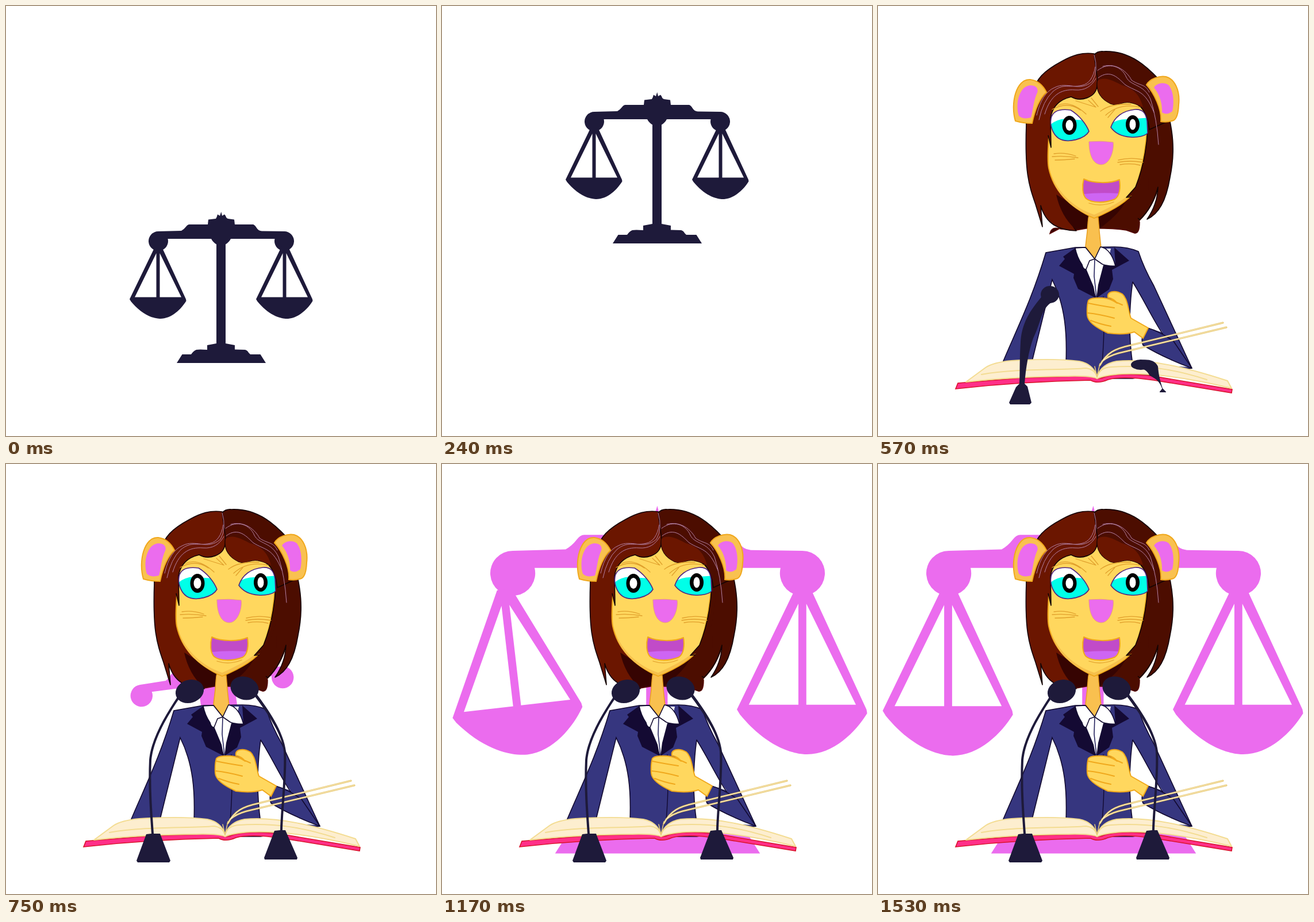
Animation, 748 px wide and 748 px high, one loop 1650 ms. Source, as an HTML page:

```html
<!DOCTYPE html>
<html lang="en">
<head>
<meta charset="utf-8">
<title>Scales of justice</title>
<style>
html, body { margin: 0; width: 100%; height: 100%; overflow: hidden; background: #fff; }
svg { display: block; width: 100vw; height: 100vh; }
.ink { fill: #1e1a3a; }
.pink { fill: #eb6cee; }
.line { fill: none; stroke-linecap: round; stroke-linejoin: round; }
.suit { fill: #36367f; stroke: #120a30; stroke-width: 1.6; stroke-linejoin: round; }
.red { fill: #6b1600; stroke: #140404; stroke-width: 1.6; stroke-linejoin: round; }
.brown { fill: #4c0d00; stroke: #140404; stroke-width: 1.6; stroke-linejoin: round; }
.skin { fill: #ffd75e; stroke: #f0a81c; stroke-width: 2; stroke-linejoin: round; }
.white { fill: #fff; stroke: #120a30; stroke-width: 1.6; stroke-linejoin: round; }
</style>
</head>
<body>
<svg viewBox="0 0 748 748">
  <defs>
    <path id="frame" d="M374.3 358L376 365L380 362.5L382 365Q383 369 386 370L397 371.5L398 380L430 380Q433 381 436 386Q439 391 445 391.5L484 392A17 17 0 1 1 467.5 405L391 405Q388 411 382 414.5L382 587L398 590L398 597.5L416 598Q420 599 422 603L425 606L442.5 606L452 621L297 621L306.5 606L322 606Q326 600 331 598Q336 597 350 598L350 590L366 587L366 414.5Q360 411 357 405L281.5 405A17 17 0 1 1 265 392L305 391Q310 388 313 384Q316 380 319 380L351 380L352 371.5L365 370Q367 367 368 362.5L372 365Z"/>
    <path id="pan" fill-rule="evenodd" d="M259.5 418L215 510Q217 514 220 517C240 540 260 544 268 544C288 544 305 527 313.5 513L313 510L270.500 418ZM261.5 430L261.5 506.5L224 506.5ZM267.5 430L267.5 506.5L305 506.5Z"/>
    <path id="rimL" d="M301 196C304 180 320 179 335 181C350 190 362 205 367 218C360 231 330 240 314 230C303 222 299 207 301 196Z"/>
    <path id="rimR" d="M405 211C411 193 426 182 447 180C461 179 466 187 468 200L469 221C460 231 420 233 405 211Z"/>
    <path id="lips" d="M358 301C375 309 405 309 420 302C422 315 421 330 412 336C395 343 372 343 362 335C355 328 355 312 358 301Z"/>
    <path id="leaf" d="M386 625C398 603 412 596 440 590L600 551M390 618Q400 609 418 604L606 559"/>
    <clipPath id="eyeL"><use href="#rimL"/></clipPath>
    <clipPath id="eyeR"><use href="#rimR"/></clipPath>
    <clipPath id="mouth"><use href="#lips"/></clipPath>
  </defs>

  <g id="big" class="pink">
    <rect id="post" y="400" height="200"/>
    <use href="#frame"/>
    <g id="panL"><use href="#pan"/></g>
    <g id="panR"><use href="#pan"/></g>
  </g>

  <g id="small" class="ink">
    <use href="#frame"/><use href="#pan"/><use href="#pan" x="220"/>
  </g>

  <g id="blob" class="ink"></g>

  <g id="figure">
    <!-- hair behind -->
    <path d="M299 396Q302 382 318 388L345 390L362 387Q405 386 432 390L446 395Q455 397 455 376L440 325L312 325L318 386Z" fill="#360402" stroke="#5a0a05" stroke-width="1.5"/>
    <path d="M386 387C408 370 425 355 440 325L490 310Q480 350 455 374Q455 396 445 393Q415 385 386 387Z" fill="#4c0d00"/>
    <!-- jacket -->
    <path class="suit" d="M292 429L343 420L411 419Q435 419 453 427Q462 455 480 487L546 630L443 648L393 648L217 620C240 565 268 510 292 429Z"/>
    <path d="M303 476L267 622L327 622C329 570 326 522 303 476Z" fill="#fff" stroke="#120a30" stroke-width="1.6"/>
    <path d="M443 480C462 510 478 545 495 568L469 560Q456 575 461 590Q495 611 543 628L443 624C436 575 436 530 443 480Z" fill="#fff"/>
    <path class="line" d="M443 624C436 575 436 530 443 480C462 510 478 545 495 570" stroke="#120a30" stroke-width="1.6"/>
    <path class="suit" d="M469 560Q455 575 461 590Q495 611 546 630L514 583Q490 566 469 560Z"/>
    <path class="line" d="M392 506Q395 560 390 620" stroke="#120a30" stroke-width="1.4"/>
    <!-- shirt, lapels -->
    <path d="M350 422L405 422L398 455L380 507L360 460Z" fill="#fff"/>
    <path class="line" d="M377 440L376 470L380 506" stroke="#23215c" stroke-width="1.6"/>
    <path d="M343 421L322 436L325 440L315 452L341 466L340 473L348 492L379 508L375 488L362 457Z" fill="#140a33"/>
    <path d="M411 420L437 443L407 459L409 475L402 493L380 508L383 485L392 451L413 451Z" fill="#140a33"/>
    <path d="M361 418L364 392L366 366L383 368Q385 395 388 420L377 440Z" fill="#f9c04f" stroke="#e99f20" stroke-width="1.5"/>
    <path class="white" d="M343 421L361 420L377 440L368 443L362 458Q357 459 355 450Q346 437 343 421Z"/>
    <path class="white" d="M377 440L387 419Q405 422 413 452Q400 453 390 449Z"/>
    <!-- hair sides -->
    <path class="red" d="M300 110C276 125 258 170 258 205C255 290 262 310 274 345L286 384L283 347C292 380 315 390 345 391Q330 375 345 360L320 240L310 150Z"/>
    <path d="M310 328Q318 365 343 388L362 386L366 365L330 340Z" fill="#360402"/>
    <path class="brown" d="M430 90Q480 110 497 160C515 215 517 255 508 298C501 340 488 362 468 371Q486 345 487 315Q478 350 455 372L430 345L455 275L466 190Z"/>
    <path d="M420 358L440 325L470 300L472 340L454 368L440 375Z" fill="#4c0d00"/>
    <!-- face -->
    <path class="skin" d="M300 175C299 215 293 262 297 282C304 315 325 346 376 369C412 354 436 338 446 322C458 290 466 250 468 212L462 160L375 138L310 155Z"/>
    <path d="M301 292C312 323 340 351 376 363C410 348 430 335 443 323Q430 344 376 368C335 352 308 325 301 292Z" fill="#f6c04c"/>
    <path d="M470 210Q467 265 449 313L433 333L446 328Q474 290 476 225Z" fill="#4c0d00"/>
    <path class="line" d="M469 215Q466 270 448 315L432 333L440 332" stroke="#140404" stroke-width="1.6"/>
    <!-- fringe -->
    <path class="red" d="M258 207C258 180 266 165 270 150C274 128 288 113 320 96C338 86 355 80 376 83Q384 110 381 140C378 160 352 167 336 158Q305 165 300 195L301 246L296 225"/>
    <path class="brown" d="M376 85Q382 78 392 79C440 77 470 108 489 128L505 200L472 215Q468 182 452 172C425 160 421 176 405 170C390 163 378 150 382 130Z"/>
    <path d="M382 130C395 121 412 132 425 138C442 143 455 152 461 176L452 172C425 160 421 176 405 170C390 163 379 150 382 130Z" fill="#6b1600"/>
    <g class="line" stroke="#b481a8" stroke-width="1">
      <path d="M376 85Q384 112 373 131C350 151 330 130 307 142Q285 151 276 190"/>
      <path d="M378 106Q373 134 355 138C334 143 323 133 304 149Q287 165 280 198"/>
      <path d="M379 126Q367 148 343 146C318 144 300 155 290 188"/>
      <path d="M382 112C402 96 425 106 432 124C440 140 462 135 474 162Q485 195 488 241"/>
      <path d="M383 125C405 108 420 128 430 137C450 150 464 145 480 185"/>
      <path d="M391 105C415 98 434 115 441 129C455 139 465 135 472 150"/>
    </g>
    <!-- ears -->
    <g stroke="#f0a81c" stroke-width="2">
      <path fill="#f9c150" d="M239 200C230 170 240 126 265 128C280 130 288 140 293 150C280 162 272 185 268 204Q252 204 239 200Z"/>
      <path fill="#f9c150" d="M467 137C473 126 490 121 501 123C516 127 526 147 523 172Q522 195 514 199Q503 203 492 201C494 180 480 151 467 137Z"/>
    </g>
    <path class="pink" d="M245 191C238 170 246 139 265 138C277 138 280 146 276 153C270 167 269 186 266 194Q252 198 245 191Z"/>
    <path class="pink" d="M480 142C485 133 500 132 506 138C515 150 515 170 512 183Q503 191 494 185C495 167 488 151 480 142Z"/>
    <!-- eyes -->
    <g clip-path="url(#eyeL)"><path d="M295 170H375V245H295Z" fill="#fff"/><path d="M295 211Q311 194 332 197L375 200V245H295Z" fill="#00ffe8"/></g>
    <g clip-path="url(#eyeR)"><path d="M400 170H475V240H400Z" fill="#fff"/><path d="M400 210Q412 197 432 197L475 194V240H400Z" fill="#00ffe8"/></g>
    <g class="line" stroke="#51267f" stroke-width="1.6"><use href="#rimL"/><use href="#rimR"/></g>
    <ellipse cx="333" cy="207.5" rx="12.5" ry="16.5"/><ellipse cx="333" cy="207.5" rx="6.5" ry="9.5" fill="#fff"/>
    <ellipse cx="443" cy="206" rx="12" ry="16"/><ellipse cx="443" cy="206" rx="5.5" ry="9.5" fill="#fff"/>
    <g class="line" stroke="#e0a02c" stroke-width="1.3">
      <path d="M303 180Q330 165 352 181M312 173Q335 163 362 188M344 165L379 176L366 164M371 160L383 175M396 190Q420 168 456 176M387 183Q405 169 440 171M400 194L412 180"/>
      <path d="M306 257Q325 254 344 261M303 262Q325 260 348 264M308 268Q325 268 342 266M418 268Q438 263 460 267M417 272Q438 268 461 272M421 276Q440 273 456 277M367 343Q388 350 410 341"/>
    </g>
    <path d="M367 236Q388 234 409 237C411 252 403 276 388 276C372 275 367 255 367 236Z" class="pink" stroke="#e89b80"/>
    <g clip-path="url(#mouth)"><path d="M350 295H430V345H350Z" fill="#c14bc8"/><path d="M350 328Q388 323 430 327V345H350Z" fill="#ce65f3"/></g>
    <use href="#lips" class="line" stroke="#f0a81c" stroke-width="2"/>
    <!-- hand -->
    <path class="skin" d="M366 512Q370 507 392 508Q405 509 416 517Q410 509 400 507C398 497 411 493 425 501C435 510 435 530 440 543L470 560L461 578L446 567C430 572 415 571 400 569C380 560 365 550 364 538Q363 522 366 512Z"/>
    <path class="line" d="M366 517Q385 521 411 525M365 534Q385 536 411 543M370 547Q388 554 405 557M416 516L425 520" stroke="#f0a81c" stroke-width="2"/>
    <!-- book -->
    <path d="M135 666L139 656L250 647L370 643Q382 652 395 645Q425 637 480 644L616 667L615 673L480 651Q425 643 400 650Q382 658 370 651Q250 653 135 666Z" fill="#ff2f88" stroke="#d9142c" stroke-width="1.6"/>
    <path d="M153 654L187 629Q200 620 232 617C280 614 320 614 350 618Q375 623 381 645Q388 623 415 618C470 613 535 628 608 652L615 665Q500 637 425 640Q395 642 381 648Q370 643 330 644Q230 645 153 654Z" fill="#fdeecf" stroke="#f3dc92" stroke-width="2" stroke-linejoin="round"/>
    <path class="line" d="M180 641C240 630 320 634 362 630Q377 632 381 645Q386 629 405 628C470 624 520 633 572 650" stroke="#f3dc92" stroke-width="2"/>
    <path class="line" d="M381 645L377 627M381 645L386 622" stroke="#e9cc7b" stroke-width="1.5"/>
    <use href="#leaf" class="line" stroke="#e3c25f" stroke-width="3"/>
    <use href="#leaf" class="line" stroke="#fdeecf" stroke-width="1.2"/>
  </g>
  <g id="mics" class="ink"></g>
</svg>
<script>
const $ = id => document.getElementById(id);
const clamp = v => Math.max(0, Math.min(1, v));
const span = (t, a, b) => clamp((t - a) / (b - a));
const lerp = (a, b, k) => a + (b - a) * k;
const show = (el, on) => el.setAttribute('display', on ? 'inline' : 'none');

function make(tag, parent) {
  const el = document.createElementNS('http://www.w3.org/2000/svg', tag);
  parent.append(el);
  return el;
}

// blend two paths that share the same commands
function blend(a, b, k) {
  const nums = b.match(/-?[\d.]+/g);
  let i = 0;
  return a.replace(/-?[\d.]+/g, v => lerp(+v, +nums[i++], k).toFixed(2));
}

function sample(d, n) {
  const p = make('path', $('blob'));
  p.setAttribute('d', d);
  const len = p.getTotalLength(), out = [];
  for (let i = 0; i < n; i++) {
    const q = p.getPointAtLength(len * i / n);
    out.push([q.x, q.y]);
  }
  p.remove();
  return out;
}

const RISE = 208, MORPH = 240, MID = 420, BODY = 510;

const shift = (list, dx, dy) => list.map(([x, y]) => [x + dx, y + dy]);
const panOuter = $('pan').getAttribute('d').split('Z')[0] + 'Z';
const dot = (x, y) => `M${x} ${y}l.1 0l0 .1Z`;

// each part: start, middle and end outline
const parts = [
  { n: 260, dy: -RISE, a: $('frame').getAttribute('d'),
    b: 'M395 204Q430 192 478 215Q500 206 506 228Q503 254 486 257Q483 290 475 325Q468 370 458 392Q448 420 435 432Q435 448 429 450L394 447L402 472Q425 473 446 483L464 584L495 584L541 588L543 596L432 582L405 585L372 595Q360 606 345 602C290 622 220 627 159 621L162 612Q175 607 190 592Q205 577 224 573L241 535C245 500 270 480 290 440L302 414L362 405Q368 395 369 379L345 386L335 381L333 345L326 323L332 280Q319 283 319 267Q328 230 344 247Q370 215 390 209Z',
    c: 'M376 80Q440 77 480 122Q505 118 523 165L514 199Q520 290 480 365L455 392L385 390L388 420L453 427L480 487L546 629L616 667L615 673L425 646L382 656L135 666L139 656L190 628L217 618Q260 520 292 429L361 418L366 390L300 394L286 384Q255 310 257 205L239 200Q232 135 265 128L290 125Q330 85 376 80Z' },
  { n: 60, dy: -RISE, a: panOuter, b: 'M275 218L288 239L277 241Z', c: dot(300, 150) },
  { n: 60, dx: 220, dy: -RISE, a: panOuter, b: 'M460 475L487 522L494 552L475 535L452 498Z', c: 'M462 480L500 545L514 583L490 566L470 530Z' },
  { n: 24, a: dot(425, 405), b: 'M482 563L537 557L467 584L500 569Z', c: 'M469 560L514 583L546 630L461 590Z' },
  { n: 24, a: dot(380, 400), b: 'M413 586L411 608L399 608Z', c: dot(400, 640) },
  { n: 24, a: dot(290, 360), b: 'M329 367L340 385L369 379L331 391Z', c: dot(345, 380) },
  { n: 50, hole: 1, a: dot(330, 390), b: 'M291 463C310 500 308 540 308 585L254 585Z', c: 'M303 477C329 522 329 570 327 618L267 618Z' },
  { n: 30, hole: 1, dy: -RISE, a: 'M262 430L262 506L224 506Z', b: dot(281, 234), c: dot(300, 150) },
  { n: 30, hole: 1, dy: -RISE, a: 'M267 430L305 506L267 506Z', b: dot(281, 234), c: dot(300, 150) },
  { n: 30, hole: 1, dx: 220, dy: -RISE, a: 'M262 430L262 506L224 506Z', b: dot(471, 513), c: dot(480, 530) },
  { n: 30, hole: 1, dx: 220, dy: -RISE, a: 'M267 430L305 506L267 506Z', b: dot(471, 513), c: dot(480, 530) }
];
for (const p of parts) {
  p.keys = [shift(sample(p.a, p.n), p.dx || 0, p.dy || 0), sample(p.b, p.n), sample(p.c, p.n)];
  p.el = make('path', $('blob'));
  if (p.hole) p.el.setAttribute('fill', '#fff');
}

function drawBlob(t) {
  const late = t >= MID;
  const k = late ? span(t, MID, BODY) : span(t, MORPH, MID);
  for (const p of parts) {
    const from = p.keys[late ? 1 : 0], to = p.keys[late ? 2 : 1];
    p.el.setAttribute('d', 'M' + from.map(([x, y], i) =>
      lerp(x, to[i][0], k).toFixed(1) + ' ' + lerp(y, to[i][1], k).toFixed(1)).join('L') + 'Z');
  }
}

// head: cx cy rx ry angle
const mics = [
  { h0: [299, 502, 16, 15, 0], h1: [319.5, 395.5, 25, 20, -18],
    a: 'M285 505C272 522 250 545 248 585C246 620 247 640 246 657L240 663L228 690L230 693L264 693L267 690L260 662L255 657C257 630 262 600 270 578C284 550 284 525 303 515Z',
    b: 'M299 404C275 440 252 480 249 515C247 560 250 600 253 643L244 644L227 690L229 693L284 693L286 690L268 643L257 643C254 600 251 560 253 515C256 482 278 442 302 407Z' },
  { h0: [457, 624, 17, 9, 0], h1: [415, 390, 25, 20, 18],
    a: 'M450 632C456 630 466 630 472 642C478 647 488 648 494 665L494 666L490 671L490 672L501 672L501 671L496 666L495 665C490 650 488 640 487 627C482 616 470 614 455 616Z',
    b: 'M432 403C452 430 480 468 483 500C485 540 478 600 477 637L467 638L449 685L450 688L506 688L507 685L486 637L481 637C482 600 489 540 487 500C483 465 456 427 436 400Z' }
];
for (const m of mics) {
  m.stem = make('path', $('mics'));
  m.head = make('ellipse', $('mics'));
}

function drawMics(t) {
  const k = Math.min(1, (t - 570) / 180);
  for (const m of mics) {
    m.stem.setAttribute('d', blend(m.a, m.b, k));
    const h = m.h0.map((v, i) => lerp(v, m.h1[i], k));
    ['cx', 'cy', 'rx', 'ry'].forEach((n, i) => m.head.setAttribute(n, h[i]));
    m.head.setAttribute('transform', `rotate(${h[4]} ${h[0]} ${h[1]})`);
  }
}

const swing = (t, a, peak, b) => Math.sin(Math.PI / 2 * Math.min(span(t, a, peak), 1 - span(t, peak, b)));

function drawBig(t) {
  const left = 1 - span(t, 720, 1080);
  const size = 2.3 * (1 - left * .555);
  $('big').setAttribute('transform',
    `translate(${375 - 18 * left} ${190 + 215 * left}) rotate(${-8.1 * left}) scale(${size}) translate(-374.5 -409)`);
  const w = 16 + 43 * left;
  $('post').setAttribute('x', 374 + 8 * left - w / 2);
  $('post').setAttribute('width', w);

  const grow = span(t, 930, 1080);
  const angL = -6.6 * swing(t, 1080, 1170, 1290) + 1.8 * swing(t, 1290, 1350, 1440);
  const angR = -6.3 * swing(t, 1230, 1380, 1530);
  const pan = (id, dx, dy, ang) => $(id).setAttribute('transform',
    `translate(${dx} ${dy}) translate(265 409) scale(${grow}) translate(-265 -409) rotate(${ang} 264.5 474)`);
  pan('panL', 0, 3, angL);
  pan('panR', 219.5, 2, angR);
}

function draw(now) {
  const t = Math.min(1530, Math.floor(now % 1650 / 30) * 30);
  const rising = t <= MORPH, body = t >= BODY;
  show($('small'), rising);
  show($('blob'), !rising && !body);
  show($('figure'), body);
  show($('mics'), t >= 540);
  show($('big'), t >= 720);
  if (rising) $('small').setAttribute('transform', `translate(0 ${-RISE * t / MORPH})`);
  else if (!body) drawBlob(t);
  if (t >= 540) drawMics(t);
  if (t >= 720) drawBig(t);
}

const start = performance.now();
function tick() {
  draw(performance.now() - start);
  requestAnimationFrame(tick);
}
tick();
</script>
</body>
</html>
```
